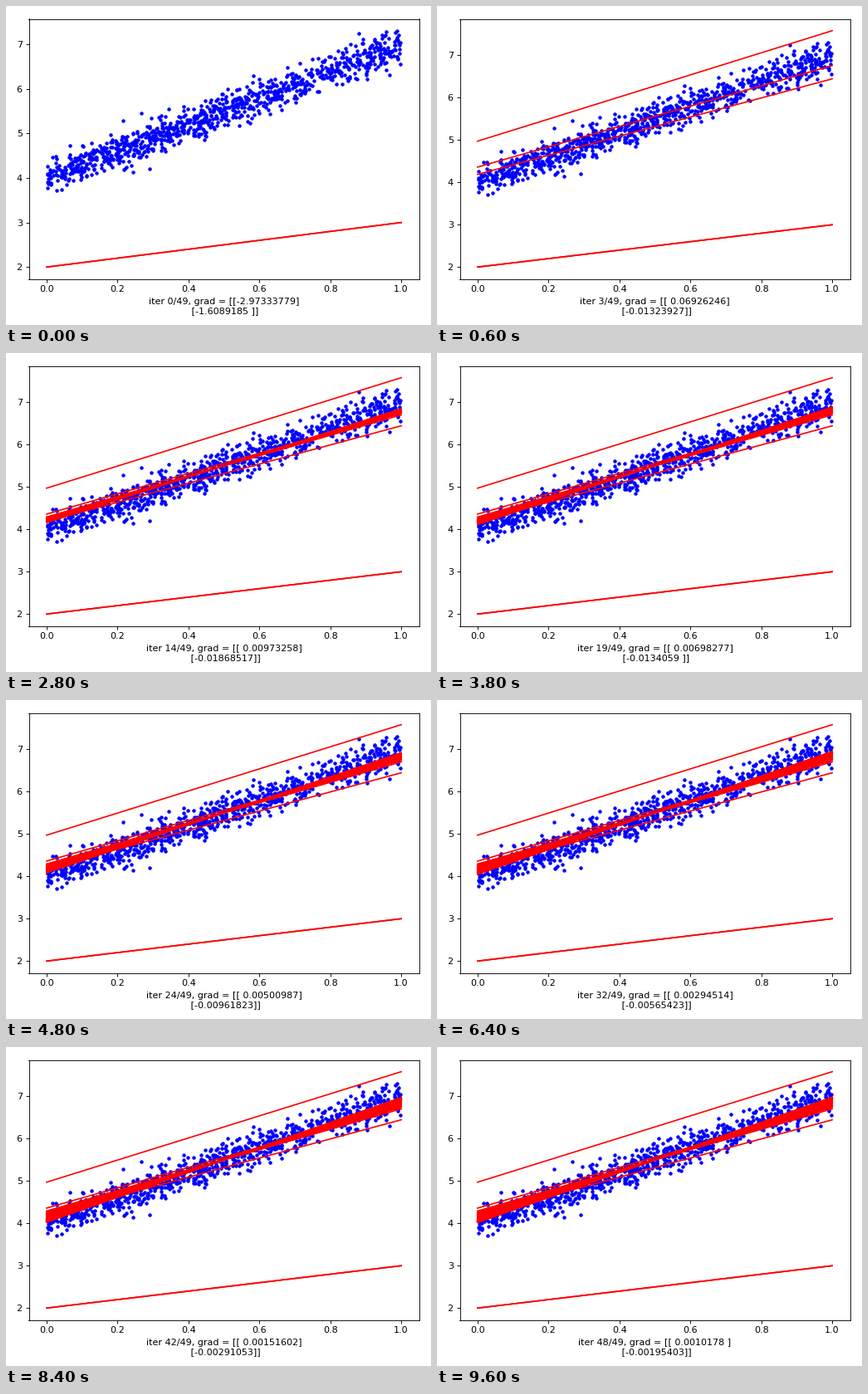
A matplotlib script for the animation above (9.8 s loop, 512x384 px).

```python
import numpy as np
import matplotlib.pyplot as plt
from matplotlib.animation import FuncAnimation

W, H, DPI = 512, 384, 80
STEPS = 49
RATE = 1.0

plt.rcParams["font.family"] = "DejaVu Sans"

# Noisy samples around y = 4 + 3x
np.random.seed(2)
x = np.random.rand(1000, 1)
y = 4 + 3 * x + 0.2 * np.random.randn(1000, 1)
design = np.hstack([np.ones_like(x), x])


def gradient(w):
    return design.T @ (design @ w - y) / len(x)


# Gradient descent from a deliberately poor start
weights = [np.array([[2.0], [1.0]])]
for _ in range(STEPS - 1):
    weights.append(weights[-1] - RATE * gradient(weights[-1]))

fig = plt.figure(figsize=(W / DPI, H / DPI), dpi=DPI)
left, right, top, bottom = 27.5, 497.5, 15.5, 328.5
ax = fig.add_axes([left / W, 1 - bottom / H,
                   (right - left) / W, (bottom - top) / H])
ax.plot(x, y, "b.")


def add_line(w):
    ends = np.array([0.0, 1.0])
    return ax.plot(ends, w[0, 0] + w[1, 0] * ends, "r-", lw=1.5)[0]


add_line(weights[0])  # the starting guess is drawn twice, so it looks heavier
lines = [add_line(w) for w in weights]
ax.set_xlim(-0.05, 1.05)


def update(i):
    for k, line in enumerate(lines):
        line.set_visible(k <= i)
    high = max([y.max()] + [w.sum() for w in weights[:i + 1]])
    margin = 0.05 * (high - 2)
    ax.set_ylim(2 - margin, high + margin)
    ax.set_xlabel(f"iter {i}/{STEPS}, grad = {gradient(weights[i])}")
    return lines


anim = FuncAnimation(fig, update, frames=STEPS, interval=200,
                     repeat=True, repeat_delay=0, blit=False)
plt.show()
```
